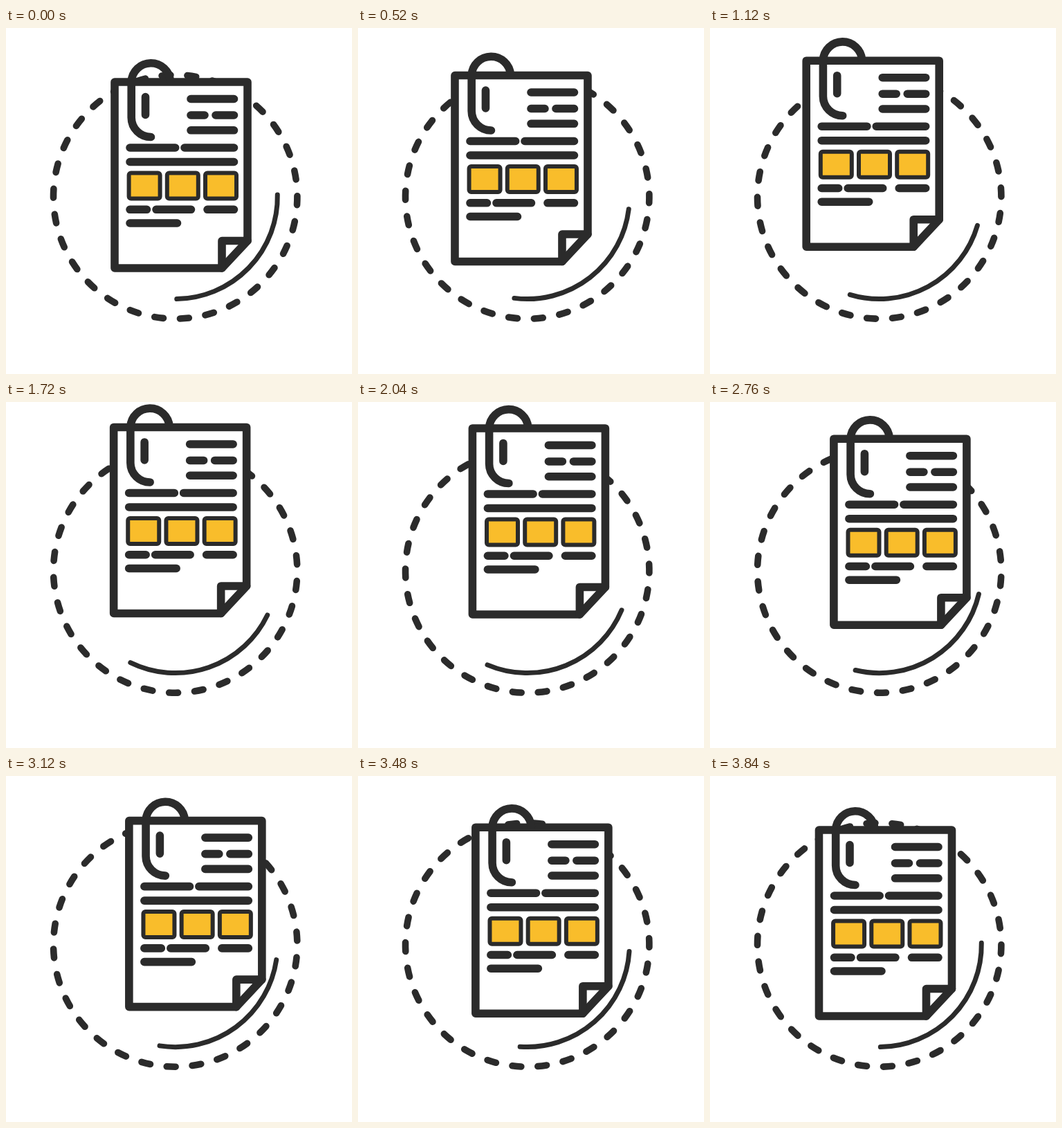
An HTML page that plays this animation: 500 by 500 pixels, repeating every 3.88 s.

```html
<!DOCTYPE html>
<html lang="en">
<head>
<meta charset="utf-8">
<title>Floating document</title>
<style>
  html, body { margin: 0; width: 100%; height: 100%; overflow: hidden; background: #fff; }
  svg { display: block; width: 100vw; height: 100vh; }
  .ink { fill: none; stroke: #2b2b2b; stroke-width: 11.6; stroke-linecap: round; stroke-linejoin: round; }
  #ring { stroke-width: 9.6; }
  #arc { stroke-width: 7; }
  #boxes { stroke-width: 6; fill: #f9bd2b; }
</style>
</head>
<body>
<svg viewBox="0 0 500 500">
  <g class="ink">
    <path id="ring"/>
    <path id="arc"/>
  </g>
  <g id="doc" class="ink">
    <path d="M157 78H349V307.5L312 347H157Z" fill="#fff"/>
    <path d="M312 347V307.5H349"/>
    <path d="M237.5 77A28.2 28.2 0 0 0 181.2 77.5V129.5A28.2 28.2 0 0 0 209.5 157.5M201.5 99.5V125.5"/>
    <path id="bars"/>
    <g id="boxes"></g>
  </g>
</svg>
<script>
const LOOP = 3880, STEP = 40, END = 3853, TURN = 1760;
const CX = 244.7, CY = 244;
const $ = id => document.getElementById(id);

function polar(r, deg) {
  const a = deg * Math.PI / 180;
  return (CX + r * Math.cos(a)).toFixed(2) + ' ' + (CY + r * Math.sin(a)).toFixed(2);
}
const arcPath = (r, from, to) => `M${polar(r, from)}A${r} ${r} 0 0 1 ${polar(r, to)}`;

// Piecewise linear value through [time, value] keys
function track(keys, t) {
  let i = 1;
  while (i < keys.length - 1 && t > keys[i][0]) i++;
  const [t0, v0] = keys[i - 1], [t1, v1] = keys[i];
  return v0 + (v1 - v0) * Math.min(1, (t - t0) / (t1 - t0));
}

// Text lines: y followed by start and end pairs
const lines = [
  [102.5, 267, 329.5],
  [126, 267, 287, 303, 329.5],
  [147.8, 267, 329.5],
  [173, 179, 244.7, 258, 329.5],
  [193.5, 179, 329.5],
  [262.3, 179, 203.5, 217, 267.5, 291, 329.5],
  [282, 179, 247.5]
];
let bars = '';
for (const [y, ...xs] of lines)
  for (let i = 0; i < xs.length; i += 2) bars += `M${xs[i]} ${y}H${xs[i + 1]}`;
$('bars').setAttribute('d', bars);

$('boxes').innerHTML = [0, 1, 2].map(i =>
  `<rect x="${177.6 + i * 55.2}" y="209.5" width="45" height="37" rx="3"/>`).join('');

const DASHES = 30, HALF = 2.1;
let ring = '';
for (let i = 0; i < DASHES; i++) {
  const a = i * 360 / DASHES;
  ring += arcPath(176.2, a - HALF, a + HALF);
}
$('ring').setAttribute('d', ring);
$('arc').setAttribute('d', arcPath(147.6, -1.2, 89.2));

const orbit = [[0, 0], [820, 90], [TURN, 180], [2900, 270], [END, 360]];
const swing = [[0, 0], [TURN, 27.5], [END, 0]];

function draw(t) {
  const a = track(orbit, t) * Math.PI / 180;
  const rx = a < Math.PI ? 20.3 : 22.3, ry = 20.8;
  const x = -rx * Math.sin(a), y = ry * (Math.cos(a) - 1);
  $('doc').setAttribute('transform', `translate(${x.toFixed(2)} ${y.toFixed(2)})`);
  $('ring').setAttribute('transform', `rotate(${1.7 - 96 * t / END} ${CX} ${CY})`);
  $('arc').setAttribute('transform', `rotate(${track(swing, t)} ${CX} ${CY})`);
}

const start = performance.now();
function tick() {
  const t = (performance.now() - start) % LOOP;
  draw(Math.floor(t / STEP) * STEP);
  requestAnimationFrame(tick);
}
tick();
</script>
</body>
</html>
```
